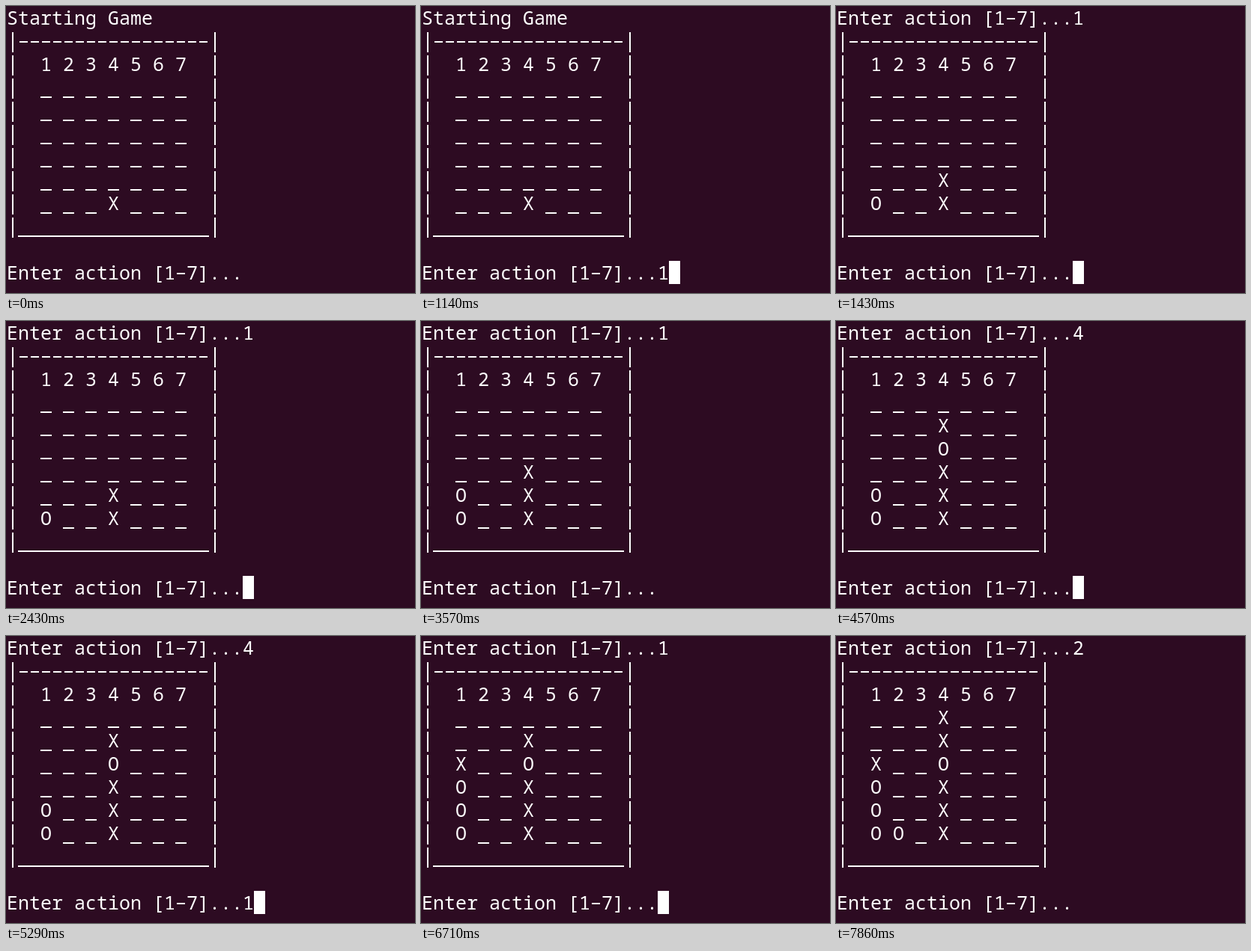
Write an HTML page that moves like this. It is 546 by 384 pixels and loops after 8000 ms.

```html
<!DOCTYPE html>
<html lang="en">
<head>
<meta charset="utf-8">
<title>Four in a row</title>
<style>
  html, body { margin: 0; width: 100%; height: 100%; overflow: hidden; background: #2d0b22; }
  svg { display: block; width: 546px; height: 384px; }
  text { font: 25px "Noto Sans Mono", "DejaVu Sans Mono", monospace; white-space: pre; fill: #fff; }
  path, rect { fill: #fff; }
</style>
</head>
<body>
<svg viewBox="0 0 546 384"><path id="rules"/><g id="rows"></g><rect id="cursor" width="15" height="31"/></svg>
<script>
const LOOP = 8000, BLINK = 570, CELL = 15, LINE = 31, ROWS = 12, LEFT = 1, BASE = 25;
const PROMPT = "Enter action [1-7]...";

// typed: key appears, enter: line is sent, shown: next board is printed
const turns = [
  { key: 1, reply: 4, typed: 1140, enter: 1290, shown: 1430 },
  { key: 1, reply: 4, typed: 2860, enter: 3000, shown: 3000 },
  { key: 4, reply: 4, typed: 4290, enter: 4430, shown: 4570 },
  { key: 1, reply: 1, typed: 5290, enter: 5570, shown: 5570 },
  { key: 2, reply: 4, typed: 7140, enter: 7290, shown: 7290 },
];

const rules = document.getElementById("rules");
const cursor = document.getElementById("cursor");
const rows = Array.from({ length: ROWS }, (_, i) => {
  const row = document.createElementNS("http://www.w3.org/2000/svg", "text");
  row.setAttribute("x", LEFT);
  row.setAttribute("y", BASE + i * LINE);
  return document.getElementById("rows").appendChild(row);
});

// Line characters as [dx, dy from baseline, width, height]
const strokes = { "|": [7, -21, 2, 27], "_": [0, 3, 15, 2], "-": [2, -9, 11, 2] };

function boardLines(done) {
  const grid = Array.from({ length: 6 }, () => Array(7).fill("_"));
  const drop = (column, piece) => {
    let y = 5;
    while (grid[y][column - 1] !== "_") y--;
    grid[y][column - 1] = piece;
  };
  drop(4, "X");
  for (const { key, reply } of done) {
    drop(key, "O");
    drop(reply, "X");
  }
  const wrap = cells => `|  ${cells.join(" ")}  |`;
  return [
    `|${"-".repeat(17)}|`,
    wrap([1, 2, 3, 4, 5, 6, 7]),
    ...grid.map(wrap),
    `|${"_".repeat(17)}|`,
  ];
}

function screenAt(t) {
  const done = turns.filter(turn => t >= turn.shown);
  const next = turns[done.length];
  const last = done[done.length - 1];
  const typed = next && t >= next.typed;
  const sent = next && t >= next.enter;
  const lines = [
    last ? PROMPT + last.key : "Starting Game",
    ...boardLines(done),
    "",
    PROMPT + (typed ? next.key : ""),
  ];
  if (sent) lines.push("");
  const blinkStart = last ? last.enter : 710;
  const lit = t >= blinkStart && Math.floor((t - blinkStart) / BLINK) % 2 === 0;
  return { lines: lines.slice(-ROWS), cursorOn: typed || lit };
}

function strokePath(lines) {
  let d = "";
  lines.forEach((line, r) => [...line].forEach((char, c) => {
    if (!strokes[char]) return;
    const [dx, dy, w, h] = strokes[char];
    d += `M${LEFT + c * CELL + dx} ${BASE + r * LINE + dy}h${w}v${h}h${-w}z`;
  }));
  return d;
}

let shownKey = "";
function render(t) {
  const { lines, cursorOn } = screenAt(t);
  const key = lines.join("\n") + cursorOn;
  if (key === shownKey) return;
  shownKey = key;
  rows.forEach((row, i) => { row.textContent = lines[i].replace(/[|_-]/g, " "); });
  rules.setAttribute("d", strokePath(lines));
  cursor.setAttribute("x", LEFT + lines[ROWS - 1].length * CELL);
  cursor.setAttribute("y", (ROWS - 1) * LINE);
  cursor.setAttribute("visibility", cursorOn ? "visible" : "hidden");
}

const start = performance.now();
function frame() {
  render((performance.now() - start) % LOOP);
  requestAnimationFrame(frame);
}
frame();
</script>
</body>
</html>
```
